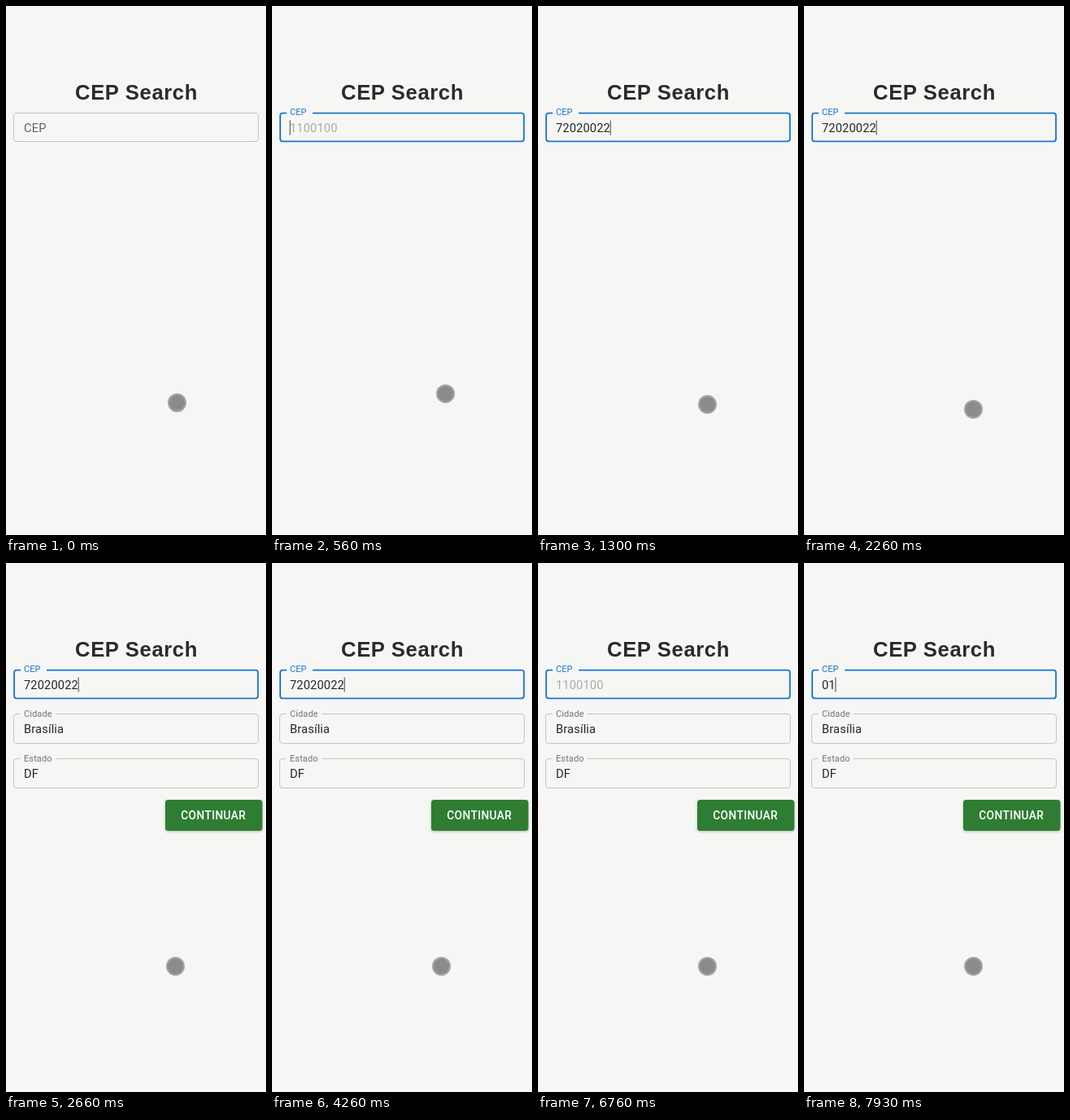
An HTML page for the animation above (8 s loop, 320 px wide and 650 px high).

```html
<!DOCTYPE html>
<html lang="pt-BR">
<head>
<meta charset="utf-8">
<title>CEP Search</title>
<style>
  html, body { margin: 0; width: 100%; height: 100%; overflow: hidden; background: #f6f6f4; }
  svg { display: block; width: 320px; height: 650px; }
  text { font: 14.67px Roboto, sans-serif; letter-spacing: .1376px; fill: #272727; }
  .title { font: bold 25.67px "Liberation Sans", Arial, sans-serif; letter-spacing: .6px; fill: #2b2b2b; }
  .label { font-size: 11px; letter-spacing: .1px; fill: #737372; }
  .outline { fill: none; stroke: #c4c4c3; }
  .notch { fill: #f6f6f4; }
  .button { fill: #2e7d32; filter: drop-shadow(0 1.5px 1.5px rgba(0, 0, 0, .28)); }
  .button-text { font-size: 13.75px; font-weight: 500; letter-spacing: .39px; fill: #fff; }
</style>
</head>
<body>
<svg viewBox="0 0 320 650">
  <text class="title" x="85" y="115">CEP Search</text>

  <rect id="idleOutline" class="outline" x="9.5" y="131.5" width="301" height="35" rx="3.5"/>
  <rect id="focusOutline" class="outline" x="10.1" y="131.6" width="300" height="34.7" rx="3" style="stroke:#1976d2;stroke-width:1.83"/>
  <rect id="notch" class="notch" x="18" y="129" width="32" height="5"/>
  <text id="label">CEP</text>
  <text id="placeholder" x="22" y="155">1100100</text>
  <text id="value" x="22" y="155"></text>
  <rect id="caret" y="140.5" width="1" height="18" fill="#444"/>

  <g id="result">
    <rect class="outline" x="9.5" y="185.5" width="301" height="36" rx="3.5"/>
    <rect class="notch" x="17.4" y="184" width="43.5" height="4"/>
    <text class="label" x="22" y="189">Cidade</text>
    <text x="22" y="209">Brasília</text>
    <rect class="outline" x="9.5" y="240.5" width="301" height="36" rx="3.5"/>
    <rect class="notch" x="17.4" y="239" width="43.5" height="4"/>
    <text class="label" x="22" y="244">Estado</text>
    <text x="22" y="264">DF</text>
    <rect class="button" x="196" y="291" width="119.5" height="38" rx="3.5"/>
    <text class="button-text" x="215.2" y="315">CONTINUAR</text>
  </g>

  <g id="pointer">
    <circle r="11.5" fill="#a3a3a2"/>
    <circle r="9.4" fill="#8b8b8a"/>
  </g>
</svg>
<script>
const LOOP = 8000, FOCUS = 150, DIGIT = 8.375;
const el = id => document.getElementById(id);
const show = (id, on) => el(id).style.display = on ? '' : 'none';
const mix = (a, b, p) => a + (b - a) * p;
const clamp = p => Math.min(1, Math.max(0, p));

// cubic-bezier(0, 0, .2, 1)
function easeOut(x) {
  let lo = 0, hi = 1;
  for (let i = 0; i < 20; i++) {
    const s = (lo + hi) / 2;
    if (.6 * (1 - s) * s * s + s ** 3 < x) lo = s; else hi = s;
  }
  return 3 * (1 - lo) * lo * lo + lo ** 3;
}

// time, x, y
const pointerPath = [
  [0, 210.5, 487.5], [500, 210.5, 487.5], [560, 213.5, 476.5], [600, 215, 473], [650, 216.5, 470.5],
  [800, 216.5, 470.5], [860, 214.5, 474.5], [970, 214.5, 474.5],
  [1300, 208.5, 489.5], [1430, 208.5, 495.5], [LOOP, 208.5, 495.5]
];
const caretOn = [
  [160, 660], [1160, 1760], [2260, 2760], [3260, 3760], [4260, 4730],
  [5230, 5660], [5760, 6160], [6360, 6760], [7260, LOOP]
];

function pointerAt(t) {
  const i = pointerPath.findIndex(k => k[0] > t);
  const [t0, x0, y0] = pointerPath[i - 1], [t1, x1, y1] = pointerPath[i];
  const p = (t - t0) / (t1 - t0);
  return [mix(x0, x1, p), mix(y0, y1, p)];
}

function valueAt(t) {
  const pasted = '72020022';
  if (t < 1260) return '';
  if (t < 5660) return pasted;
  if (t < 6160) return pasted.slice(0, 7);
  if (t < 7700) return pasted.slice(0, Math.max(0, 6 - Math.floor((t - 6160) / 33.3)));
  return t < 7930 ? '0' : '01';
}

function render(t) {
  const focused = t >= 160;
  const p = focused ? easeOut(clamp((t - FOCUS) / 200)) : 0;
  const value = valueAt(t);

  show('idleOutline', !focused);
  show('focusOutline', focused);
  show('notch', t >= FOCUS + 55);
  el('label').setAttribute('transform', `translate(22 ${mix(155, 134.3, p)}) scale(${mix(1, .75, p)})`);
  el('label').style.fill = `color-mix(in srgb, #1976d2 ${p * 100}%, #636362)`;

  el('placeholder').style.opacity = value ? 0 : .36 * p;
  el('value').textContent = value;
  el('caret').setAttribute('x', 21.7 + value.length * DIGIT);
  show('caret', caretOn.some(([from, to]) => t >= from && t < to));

  show('result', t >= 2660);
  el('pointer').setAttribute('transform', `translate(${pointerAt(t)})`);
}

const start = performance.now();
function tick() {
  render((performance.now() - start) % LOOP);
  requestAnimationFrame(tick);
}
tick();
</script>
</body>
</html>
```
